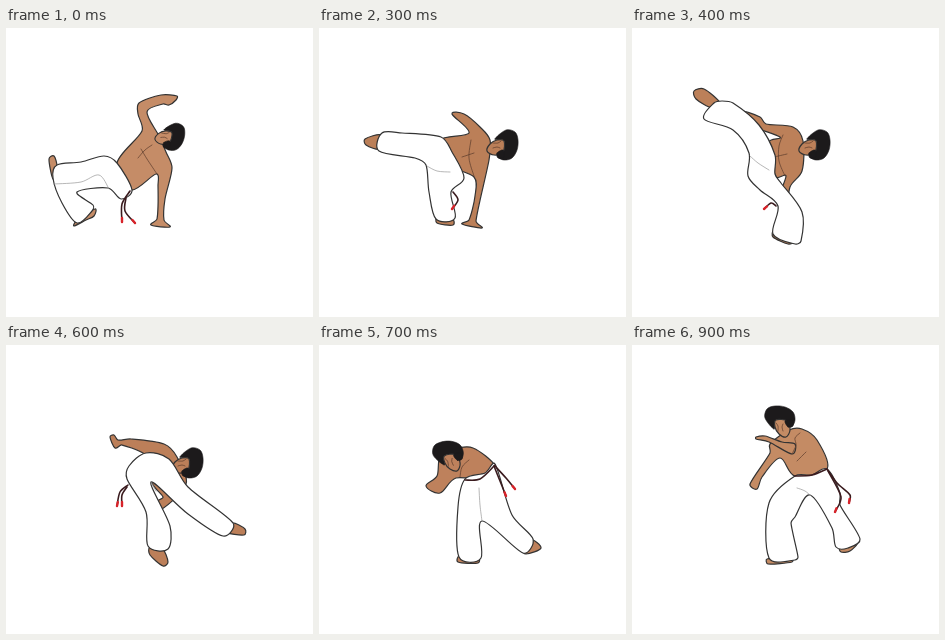
Write an HTML page with a canvas that moves like this. It is 307 px wide and 289 px high and loops after 1.4 s.

```html
<!DOCTYPE html>
<html lang="en">
<head>
<meta charset="utf-8">
<title>Capoeira kick</title>
<style>
  html, body { margin: 0; width: 100%; height: 100%; overflow: hidden; background: #fff; }
  canvas { display: block; width: 100vw; height: 100vh; }
</style>
</head>
<body>
<canvas id="stage"></canvas>
<script>
const WIDTH = 307, HEIGHT = 289, LOOP = 1400;
const INK = '#333', HAIR = '#1c1a1b', RED = '#d8232a';
const canvas = document.getElementById('stage');
const ctx = canvas.getContext('2d');
const ratio = window.devicePixelRatio || 1;
canvas.width = WIDTH * ratio;
canvas.height = HEIGHT * ratio;
let tone;

// Smooth curve through "x y x y ..."
function curve(text, { fill, stroke = INK, width = 1.2 }) {
  const n = text.split(' ').map(Number), count = n.length / 2;
  const at = i => {
    const k = fill ? (i + count) % count : Math.max(0, Math.min(count - 1, i));
    return [n[2 * k], n[2 * k + 1]];
  };
  ctx.beginPath();
  ctx.moveTo(...at(0));
  for (let i = 0; i < (fill ? count : count - 1); i++) {
    const [a, b, c, d] = [at(i - 1), at(i), at(i + 1), at(i + 2)];
    // Handles never outgrow their own segment, so corners stay tight
    const reach = Math.hypot(c[0] - b[0], c[1] - b[1]) / 3;
    const handle = (p, q) => {
      const size = Math.hypot(q[0] - p[0], q[1] - p[1]);
      return p.map((v, k) => (q[k] - v) * Math.min(1 / 6, reach / (size || 1)));
    };
    const h1 = handle(a, c), h2 = handle(b, d);
    ctx.bezierCurveTo(b[0] + h1[0], b[1] + h1[1], c[0] - h2[0], c[1] - h2[1], ...c);
  }
  if (fill) { ctx.closePath(); ctx.fillStyle = fill; ctx.fill(); }
  ctx.strokeStyle = stroke;
  ctx.lineWidth = width;
  ctx.stroke();
}
const skin = text => curve(text, { fill: tone });
const cloth = text => curve(text, { fill: '#fff' });
const hair = text => curve(text, { fill: HAIR, stroke: HAIR, width: .6 });
const crease = text => curve(text, { stroke: '#5b3c2c', width: .7 });
const fold = text => curve(text, { stroke: '#999', width: .7 });
const belt = text => curve(text, { stroke: '#3a1b1e', width: 1.6 });

// Belt end with a short red tip along its last stretch
function cord(text) {
  belt(text);
  const [x1, y1, x2, y2] = text.split(' ').slice(-4).map(Number);
  const part = 4 / Math.hypot(x2 - x1, y2 - y1);
  curve([x2 - (x2 - x1) * part, y2 - (y2 - y1) * part, x2, y2].join(' '), { stroke: RED, width: 2.4 });
}

// Head lies with its crown to the right; turn is in degrees
function head(x, y, turn = 0, scale = 1) {
  ctx.save();
  ctx.translate(x, y);
  ctx.rotate(turn * Math.PI / 180);
  ctx.scale(scale, scale);
  hair('-12 -6 -1 -15 8 -13 11 -5 10 5 5 13 -3 15 -9 12 -4 7 -3 -4');
  skin('-3 -4 -10 -5 -17 -1 -20 6 -13 10 -4 7');
  crease('-14 3 -10 2 -7 3');
  crease('-14 -2 -9 -2 -6 -4');
  hair('-10 8 -4 5 -3 12 -9 13');
  ctx.restore();
}

const poses = [
  { start: 0, tone: '#c58c67', draw() {
    skin('51 139 48 128 43 131 47 151');
    skin('71 192 68 198 80 192 88 188 89 181');
    skin('171 68 155 67 133 75 132 86 136 103 111 135 125 162 150 146 152 158 151 191 145 197 164 199 158 192 159 171 166 140 160 124 153 108 141 84 157 76 163 77 170 72');
    head(168, 109, 10, .92);
    crease('146 117 139 122 132 130');
    crease('135 121 141 131 151 146');
    cloth('111 135 98 128 75 134 51 137 47 150 56 175 71 195 86 183 87 177 71 164 102 160 115 171 126 162');
    fold('48 156 75 154 93 147 103 161');
    cord('124 163 116 176 116 194');
    cord('120 170 119 183 129 195');
  } },
  { start: 200, tone: '#b97d56', draw() {
    skin('57 167 53 176 64 174');
    skin('184 73 160 73 148 80 153 104 122 116 126 136 156 149 155 172 151 193 143 196 164 200 157 193 167 146 171 112 160 86 167 80 178 82 179 79 185 81');
    head(188, 117);
    crease('155 125 146 128 138 132');
    crease('156 110 152 128 156 149');
    cloth('123 115 72 123 60 129 57 145 57 166 72 171 74 155 83 149 106 140 108 152 143 153 148 145 138 135 126 136');
    skin('108 151 124 154 137 152 131 161 113 160');
    belt('122 116 124 124 126 135');
    cord('125 162 122 169 112 170');
    cord('131 163 130 171 124 175');
  } },
  { start: 300, tone: '#bb7f58', draw() {
    skin('62 107 46 111 47 117 61 121');
    skin('145 86 133 86 150 105 121 112 128 136 155 149 156 168 150 192 143 196 163 200 157 193 170 132 171 112 161 99');
    head(188, 117);
    crease('155 125 143 129');
    crease('152 112 150 130 155 148');
    skin('119 188 118 195 134 197 133 190');
    cloth('122 109 83 105 63 105 60 123 96 130 107 137 110 164 117 191 136 190 132 164 145 150 133 124');
    fold('108 138 118 143 131 144');
    cord('134 164 139 172 133 181');
  } },
  { start: 400, tone: '#bc8059', draw() {
    skin('88 75 72 61 62 63 64 71 80 80');
    skin('142 203 141 209 156 216 162 213');
    skin('108 83 128 89 134 96 161 99 171 113 170 143 158 159 155 181 145 175 154 148 144 149 137 114 148 109 118 97');
    head(187, 117);
    crease('155 126 142 129');
    crease('151 107 147 118 147 133 153 148');
    cloth('90 73 82 75 72 91 101 102 117 125 116 148 128 162 146 178 141 206 163 216 169 213 170 184 149 155 143 146 143 127 127 97 101 75');
    fold('118 128 126 135 137 142');
    cord('144 178 139 175 132 181');
  } },
  { start: 500, tone: '#bb7e58', draw() {
    skin('185 67 190 57 203 54 196 73');
    skin('143 204 143 212 158 219 157 205');
    skin('111 90 107 96 142 110 138 128 156 152 150 179 158 178 169 145 170 108 142 98');
    head(187, 118);
    cloth('126 117 145 101 182 63 199 76 151 137 152 152 167 181 163 208 142 204 139 172 119 150');
    fold('133 131 144 133 152 130');
    cord('121 152 118 161 122 171');
  } },
  { start: 600, tone: '#bc7f59', draw() {
    skin('144 202 144 210 157 221 162 217 156 203');
    skin('226 178 239 184 238 190 220 187');
    skin('104 92 108 90 112 95 125 94 158 99 171 112 180 139 156 164 152 156 157 152 146 138 142 112 116 100 109 103');
    head(186, 118);
    cloth('140 108 123 121 121 134 140 167 142 201 162 204 164 181 145 137 182 169 217 191 227 178 182 142 163 114');
    fold('145 137 150 146');
    cord('122 140 114 147 111 161');
    cord('121 142 116 150 116 161');
  } },
  { start: 700, tone: '#be815c', draw() {
    skin('141 210 139 217 159 218 159 211');
    skin('211 194 222 203 207 209 203 204');
    skin('121 112 135 104 154 103 176 121 168 135 137 133 121 148 107 141 118 131');
    head(129, 107, -100);
    crease('141 132 143 122 150 115');
    cloth('146 134 139 162 140 212 162 213 163 176 204 208 214 194 193 170 176 119 166 128');
    fold('160 143 161 160 163 176');
    belt('146 135 161 134 176 120');
    cord('175 121 181 136 187 151');
    cord('176 121 187 133 196 144');
  } },
  { start: 800, tone: '#c1865f', draw() {
    skin('137 214 136 219 159 219 157 215');
    skin('218 206 213 219 200 230 197 226 203 218');
    head(102, 101, -100);
    skin('112 110 120 103 155 107 177 119 156 137 125 128 117 127 103 139 86 130 87 125 95 124 96 129 104 129');
    crease('119 127 120 120 126 118 129 128');
    cloth('154 135 136 163 139 200 138 215 159 219 164 212 162 174 185 202 200 221 217 208 217 203 193 182 188 135 177 118 170 129');
    fold('164 142 165 158 162 176');
    belt('154 136 168 130 176 120');
    cord('176 120 179 145 190 162');
    cord('176 122 185 135 204 146');
  } },
  { start: 900, tone: '#c48b64', draw() {
    skin('135 214 136 219 160 217 160 213');
    skin('208 202 209 207 218 206 225 198');
    skin('157 85 170 84 185 95 195 124 163 131 148 113 130 132 125 144 118 139 138 108 138 99');
    head(148, 72, -90);
    skin('160 109 137 97 124 94 124 92 133 91 150 97 163 99');
    crease('160 109 164 100 163 93 168 88');
    crease('165 116 174 107');
    cloth('163 131 137 158 137 213 163 215 166 212 159 178 163 172 178 150 200 183 204 202 216 203 228 194 208 160 208 148 195 124 180 130');
    fold('165 143 173 146 179 151');
    belt('163 131 180 130 195 124');
    cord('195 124 205 138 218 150 217 158');
    cord('196 126 209 152 203 167');
  } }
];

function render() {
  const time = performance.now() % LOOP;
  const pose = poses.filter(p => p.start <= time).pop();
  ctx.setTransform(ratio, 0, 0, ratio, 0, 0);
  ctx.fillStyle = '#fff';
  ctx.fillRect(0, 0, WIDTH, HEIGHT);
  ctx.lineJoin = ctx.lineCap = 'round';
  tone = pose.tone;
  pose.draw();
  requestAnimationFrame(render);
}
render();
</script>
</body>
</html>
```
